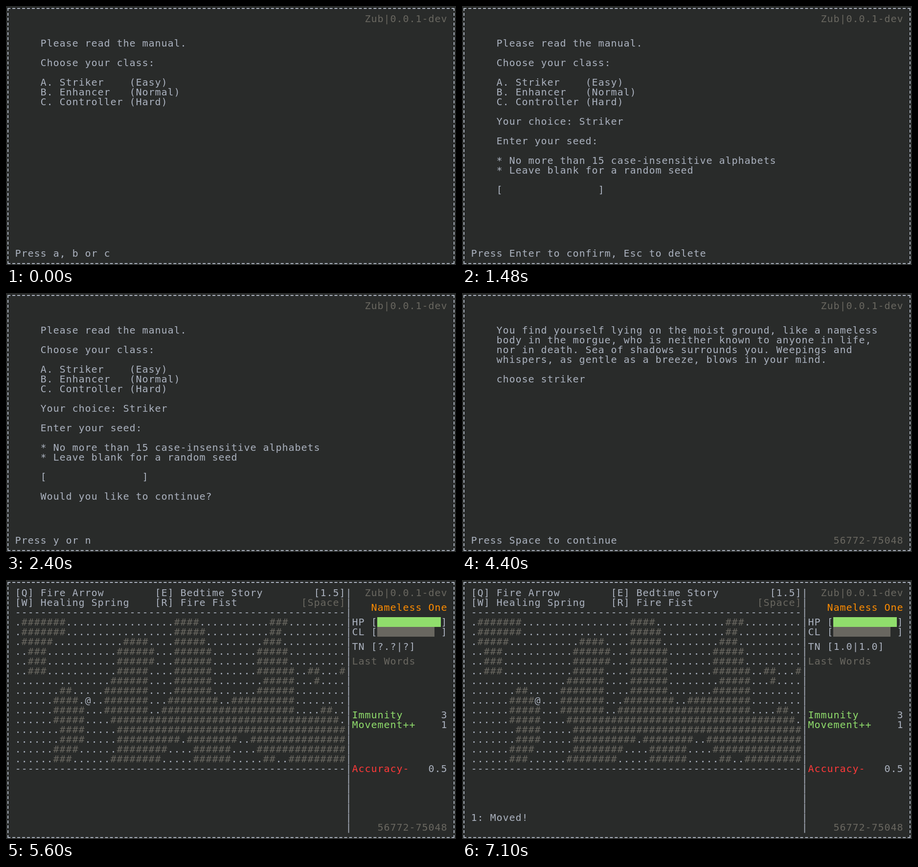
Animation, 920 px wide and 530 px high, one loop 8 s. Source, as an HTML page:

```html
<!DOCTYPE html>
<html lang="en">
<head>
<meta charset="utf-8">
<title>Terminal adventure</title>
<style>
  html, body { margin: 0; width: 100%; height: 100%; overflow: hidden; background: #292b2a; }
  #frame { position: absolute; left: 3px; top: 4px; width: 910px; height: 520px; border: 2px dashed #abb2bf; }
  svg { position: absolute; left: 0; top: 0; }
  text { font: 20px "DejaVu Sans Mono", monospace; text-anchor: middle; white-space: pre; }
</style>
</head>
<body>
<div id="frame"></div>
<svg id="stage" width="920" height="530" viewBox="0 0 920 530"></svg>
<script>
const LIGHT = '#abb2bf', GREY = '#696760', GREEN = '#90de6c', ORANGE = '#ff8c00', RED = '#ff3939';
const CELL = 13, LINE = 20, LEFT = 18, TOP = 26;
const LOOP = 8000;
const stage = document.getElementById('stage');

function add(parent, tag, attrs) {
  const el = document.createElementNS('http://www.w3.org/2000/svg', tag);
  for (const key in attrs) el.setAttribute(key, attrs[key]);
  return parent.appendChild(el);
}

// Rows may be fractional; every character is centred in its grid cell.
function put(parent, col, row, str, fill = LIGHT) {
  const xs = [...str].map((_, i) => LEFT + (col + i + 0.5) * CELL);
  add(parent, 'text', { x: xs.join(' '), y: TOP + row * LINE + 7, fill }).textContent = str;
}

function putLines(parent, col, row, lines) {
  lines.forEach((line, i) => line && put(parent, col, row + i, line));
}

function bar(parent, row, cells, fill) {
  add(parent, 'rect', {
    x: LEFT + 57 * CELL, y: TOP + (row - 0.5) * LINE, width: cells * CELL, height: LINE, fill
  });
}

// A screen is a group visible from one time until another.
const screens = [];
function screen(from, to, build) {
  const group = add(stage, 'g', {});
  build(group);
  screens.push({ group, from, to });
}

// Column ranges of walls, one string per map row.
const WALLS = [
  '1-7 25-28 40-42',
  '1-7 25-29 40-41',
  '1-5 17-20 25-29 39-41',
  '2-4 16-21 25-30 38-42',
  '2-4 16-21 25-30 38-42',
  '2-4 16-20 25-30 38-43 46-47 51-51',
  '15-20 25-30 39-43 47-47',
  '7-8 14-20 25-30 38-43',
  '6-9 14-20 24-31 34-43',
  '6-10 14-20 23-43 48-49',
  '6-10 15-50',
  '7-10 16-51',
  '7-10 16-25 27-34 37-51',
  '6-9 16-23 28-33 38-51',
  '6-8 15-22 28-33 39-40 43-51'
];
const HERO_ROW = 8, HERO_COL = 10;

function drawMap(g) {
  WALLS.forEach((spec, r) => {
    const ranges = spec.split(' ').map(s => s.split('-').map(Number));
    let walls = '', floor = '';
    for (let c = 0; c < 52; c++) {
      const solid = ranges.some(([a, b]) => c >= a && c <= b);
      const hero = r === HERO_ROW && (c === HERO_COL || c === HERO_COL + 1);
      walls += solid ? '#' : ' ';
      floor += solid || hero ? ' ' : '.';
    }
    put(g, 0, r + 3, floor);
    put(g, 0, r + 3, walls, GREY);
  });
}

screen(0, LOOP, g => put(g, 55, 0, 'Zub|0.0.1-dev', GREY));

screen(0, 4400, g => putLines(g, 4, 2.5, [
  'Please read the manual.', '',
  'Choose your class:', '',
  'A. Striker    (Easy)',
  'B. Enhancer   (Normal)',
  'C. Controller (Hard)'
]));

screen(0, 100, g => put(g, 0, 24, 'Press a, b or c'));

screen(100, 4400, g => putLines(g, 4, 10.5, [
  'Your choice: Striker', '',
  'Enter your seed:', '',
  '* No more than 15 case-insensitive alphabets',
  '* Leave blank for a random seed', '',
  '[' + ' '.repeat(15) + ']'
]));

screen(100, 2400, g => put(g, 0, 24, 'Press Enter to confirm, Esc to delete'));

screen(2400, 4400, g => {
  put(g, 4, 19.5, 'Would you like to continue?');
  put(g, 0, 24, 'Press y or n');
});

screen(4400, LOOP, g => put(g, 57, 24, '56772-75048', GREY));

screen(4400, 5600, g => {
  putLines(g, 4, 2.5, [
    'You find yourself lying on the moist ground, like a nameless',
    'body in the morgue, who is neither known to anyone in life,',
    'nor in death. Sea of shadows surrounds you. Weepings and',
    'whispers, as gentle as a breeze, blows in your mind.', '',
    'choose striker'
  ]);
  put(g, 0, 24, 'Press Space to continue');
});

screen(5600, LOOP, g => {
  putLines(g, 0, 0, ['[Q] Fire Arrow', '[W] Healing Spring', '-'.repeat(52)]);
  putLines(g, 22, 0, ['[E] Bedtime Story', '[R] Fire Fist']);
  put(g, 47, 0, '[1.5]');
  put(g, 45, 1, '[Space]', GREY);
  drawMap(g);
  put(g, 0, 18, '-'.repeat(52));
  putLines(g, 52, 0, Array(25).fill('|'));

  put(g, 56, 1.5, 'Nameless One', ORANGE);
  putLines(g, 53, 3, ['HP [          ]', 'CL [          ]']);
  bar(g, 3, 10, GREEN);
  bar(g, 4, 9, GREY);
  put(g, 53, 5.5, 'TN [');
  put(g, 53, 7, 'Last Words', GREY);
  put(g, 53, 12.5, 'Immunity', GREEN);
  put(g, 53, 13.5, 'Movement++', GREEN);
  putLines(g, 67, 12.5, ['3', '1']);
  put(g, 53, 18, 'Accuracy-', RED);
  put(g, 65, 18, '0.5');
});

screen(5600, 7100, g => {
  put(g, HERO_COL, HERO_ROW + 3, '.@');
  put(g, 57, 5.5, '?.?|?]');
});

screen(7100, LOOP, g => {
  put(g, HERO_COL, HERO_ROW + 3, '@.');
  put(g, 57, 5.5, '1.0|1.0]');
  put(g, 0, 23, '1: Moved!');
});

function render(t) {
  for (const { group, from, to } of screens) {
    group.style.display = t >= from && t < to ? '' : 'none';
  }
}

function tick() {
  render(performance.now() % LOOP);
  requestAnimationFrame(tick);
}
tick();
</script>
</body>
</html>
```
